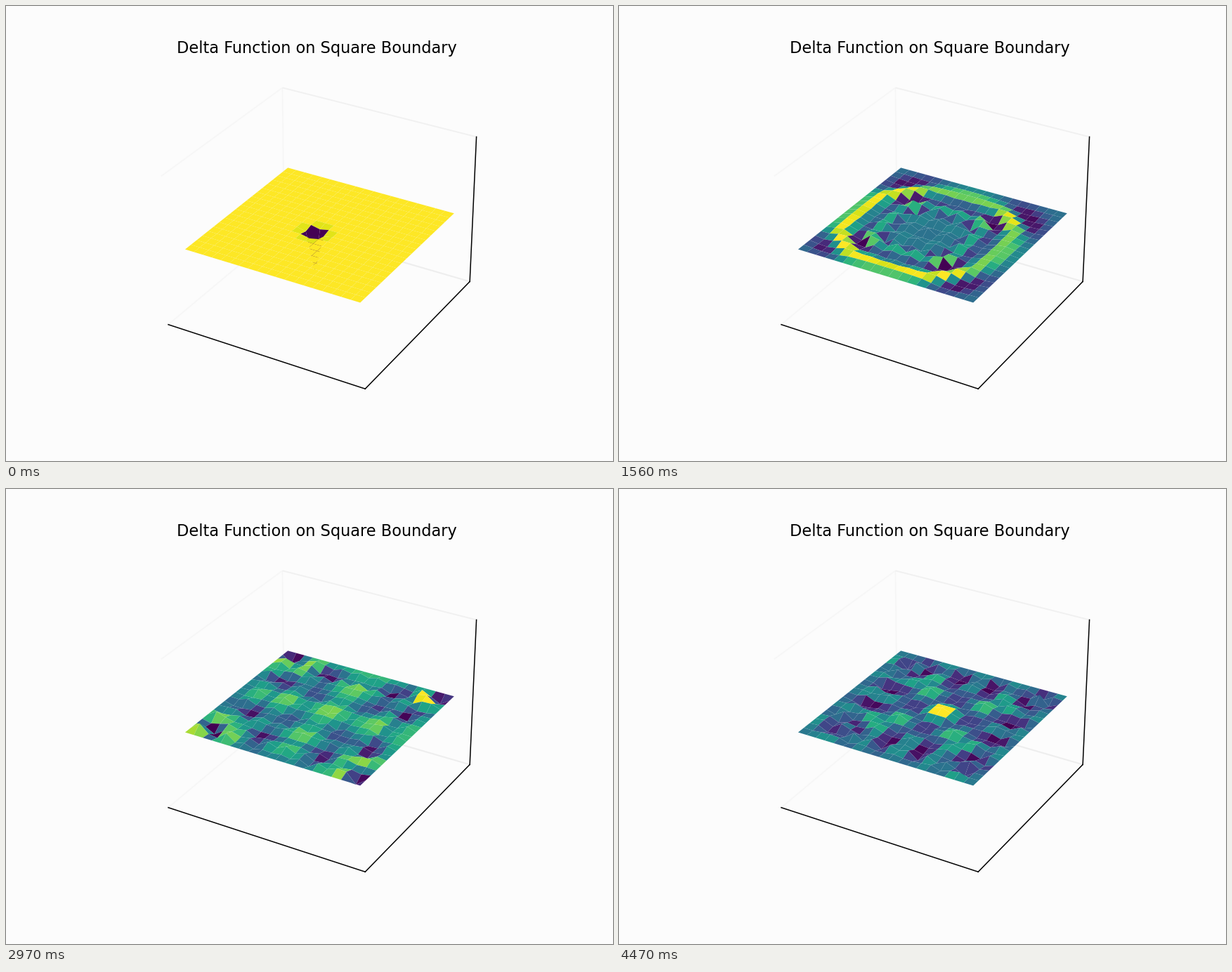
Recreate the animation shown at these times as a matplotlib script. Size 864x648 px, loop 4500 ms.

```python
import numpy as np
import matplotlib.pyplot as plt
from matplotlib.animation import FuncAnimation
from mpl_toolkits.mplot3d.art3d import Poly3DCollection

N = 20            # grid points per side
FRAMES = 150
COURANT = 0.2     # wave speed * dt / dx
BACK = "#fcfcfc"


def simulate():
    """Leapfrog wave equation with fixed edges, started from a point dip at rest."""
    u = np.zeros((N, N))
    u[9, 9] = -1
    prev = u.copy()
    states = []
    for _ in range(FRAMES):
        new = np.zeros_like(u)
        lap = (u[2:, 1:-1] + u[:-2, 1:-1] + u[1:-1, 2:] + u[1:-1, :-2]
               - 4 * u[1:-1, 1:-1])
        new[1:-1, 1:-1] = 2 * u[1:-1, 1:-1] - prev[1:-1, 1:-1] + COURANT**2 * lap
        prev, u = u, new
        states.append(u)
    return states


def quads(z):
    """Four-cornered cells of the surface, shape (cells, 4, 3)."""
    p = np.stack([X, Y, z], axis=-1)
    cells = np.stack([p[:-1, :-1], p[:-1, 1:], p[1:, 1:], p[1:, :-1]], axis=2)
    return cells.reshape(-1, 4, 3)


side = np.linspace(-1, 1, N)
X, Y = np.meshgrid(side, side)
states = simulate()

fig = plt.figure(figsize=(6.4, 4.8), dpi=135, facecolor=BACK)
ax = fig.add_subplot(projection="3d", facecolor=BACK)
fig.text(0.5125, 0.88 + 11.25 / 648, "Delta Function on Square Boundary",
         fontsize=12, family="DejaVu Sans", ha="center", va="baseline")

surf = Poly3DCollection(quads(states[0]), cmap="viridis", linewidth=0,
                        antialiased=True)
ax.add_collection3d(surf)

pad = 25 / 24     # small gap between the data limits and the box
ax.set_xlim(-1.1 * pad, 1.1 * pad)
ax.set_ylim(-1.1 * pad, 1.1 * pad)
ax.set_zlim(-1.5 * pad, 1.5 * pad)
ax.view_init(elev=30, azim=-60)
ax.grid(False)
for axis in (ax.xaxis, ax.yaxis, ax.zaxis):
    axis.set_ticks([])
    axis.pane.set_fill(False)


def update(i):
    cells = quads(states[i])
    level = cells[:, :, 2].mean(axis=1)
    surf.set_verts(cells)
    surf.set_array(level)
    surf.set_clim(level.min(), level.max())
    return [surf]


anim = FuncAnimation(fig, update, frames=FRAMES, init_func=lambda: update(0),
                     interval=30, repeat=True, repeat_delay=0, blit=False)
plt.show()
```
